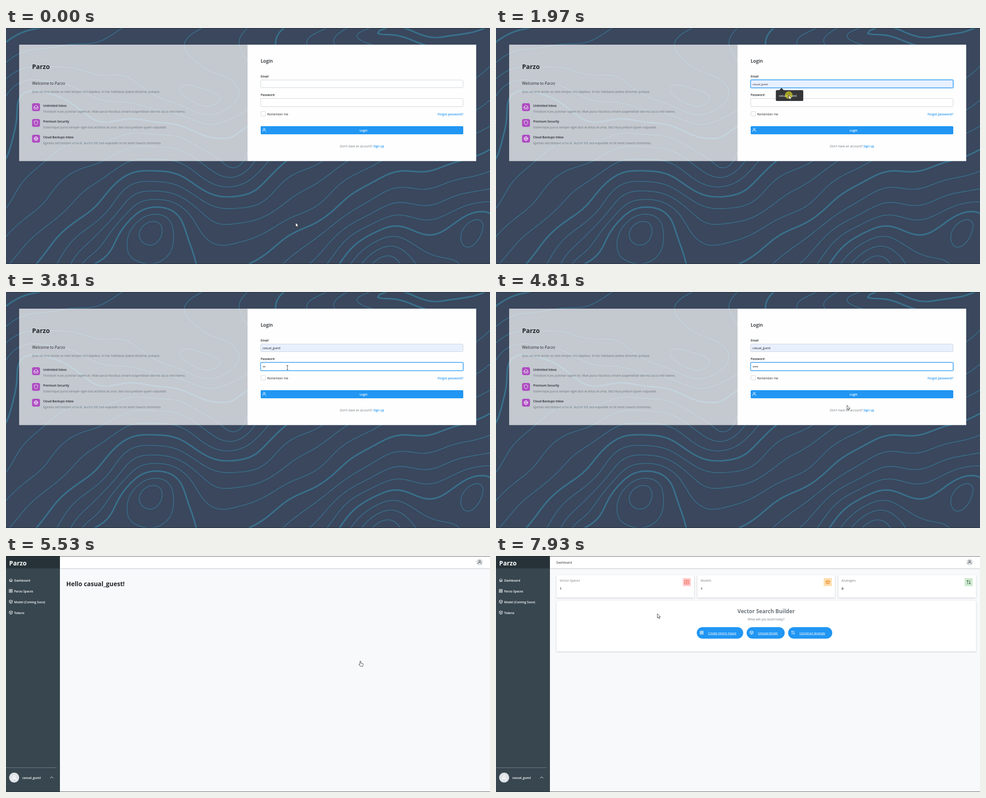
An HTML page that plays this animation: 1068x524 px, repeating every 8 s.

```html
<!DOCTYPE html>
<html lang="en">
<head>
<meta charset="utf-8">
<title>Login demo</title>
<style>
html, body { margin: 0; width: 100%; height: 100%; overflow: hidden; }
svg { display: block; width: 100%; height: 100%; }
text { font: 6.7px "Open Sans", "Noto Sans", sans-serif; fill: #212529; }
.semi { font-weight: 600; }
.bold { font-weight: 700; }
.mid { text-anchor: middle; }
.end { text-anchor: end; }
.grey { fill: #6c757d; }
.pale { fill: #9a9a9a; }
.white { fill: #fff; }
.blue { fill: #2196f3; }
.line { text-decoration: underline; }
.icon { fill: none; stroke: #fff; stroke-width: .9; stroke-linejoin: round; stroke-linecap: round; }
.field { fill: #fff; stroke: #ced4da; }
.card { fill: #fff; filter: drop-shadow(0 1px 1.5px #0003); }
#map { fill: none; stroke: #39708b; stroke-linecap: round; }
#cursor path { fill: #fff; stroke: #111; stroke-width: .75; stroke-linejoin: round; }
</style>
</head>
<body>
<svg viewBox="0 0 1068 524" preserveAspectRatio="none">
<defs>
  <g id="user"><circle cy="-1.7" r="2"/><path d="M-3.6 4V3Q-3.4 1.2-1.4 1.2H1.4Q3.4 1.2 3.6 3V4"/></g>
  <g id="home"><path d="M-3.6 0 0-3.3 3.6 0M-2.7-.7V3.2H2.7V-.7M-.9 3V.9H.9V3"/></g>
  <g id="grid"><path d="M-3.4-3.4h2.7v2.7h-2.7zM.7-3.4h2.7v2.7H.7zM-3.4.7h2.7v2.7h-2.7zM.7.7h2.7v2.7H.7z"/></g>
  <g id="box"><path d="M0-3.8 3.4-2V2L0 3.8-3.4 2V-2ZM-3.4-2 0-.2 3.4-2M0-.2V3.8"/></g>
  <g id="sort"><path d="M-2 3.6V-3.6M-3.6-2-2-3.6-.4-2M2-3.6V3.6M.4 2 2 3.6 3.6 2"/></g>
  <g id="table"><path d="M-4.2-3.6H4.2V3.6H-4.2ZM0-3.6V3.6M-4.2 0H4.2"/></g>
  <g id="inbox"><path d="M-4.2-.5-2.2-3.2Q0-5 2.2-3.2L4.2-.5V4H-4.2ZM-4.2 0H-2L-1 1.7H1L2 0H4.2"/></g>
  <g id="shield"><path d="M0-4.7 4-3.3Q4.5 2.3 0 4.7-4.5 2.3-4-3.3Z"/></g>
  <g id="globe"><circle r="4.3"/><ellipse rx="1.9" ry="4.3"/><path d="M-4.3 0H4.3"/></g>
</defs>

<g id="login">
  <rect width="1068" height="524" fill="#3a475d"/>
  <g id="map"></g>
  <rect x="29" y="37" width="504" height="258.5" fill="#fff" opacity=".7"/>
  <rect x="533" y="37" width="504.5" height="258.5" fill="#fefefe"/>
  <g id="form">
    <rect id="ring" fill="none" stroke="#a6d5fa" stroke-width="3" rx="2" x="562" width="447" height="18"/>
    <rect id="email" class="field" x="562" y="115.5" width="446.5" height="17" rx="2"/>
    <rect id="pass" class="field" x="562" y="156.5" width="446.5" height="18" rx="2"/>
    <rect class="field" x="562.5" y="185.5" width="10.5" height="10" rx="2"/>
    <rect id="button" x="562" y="218" width="447" height="18" rx="2"/>
    <text id="name" x="566" y="126.5">casual_guest</text>
    <g id="dots"></g>
    <path id="caret" d="M0 161.5V170.5" stroke="#212529" stroke-width=".6"/>
  </g>
  <g id="tip">
    <path d="M624 139 630 133 636 139Z" fill="#333"/>
    <rect x="617.5" y="138" width="60.5" height="24" rx="2" fill="#343537"/>
    <text class="white mid" x="644" y="153">casual_guest</text>
  </g>
</g>

<g id="app">
  <rect width="1068" height="524" fill="#f8f9fb"/>
  <rect class="card" x="119" width="949" height="27"/>
  <rect width="119" height="524" fill="#37464f"/>
  <rect width="119" height="27.5" fill="#263238"/>
  <rect id="hover" y="42" width="111.5" height="24" fill="#263238"/>
  <g id="side">
    <path d="M0 470H111.5" stroke="#7d878c"/>
    <path class="icon" d="M97.5 493.5 100.8 490 104.2 493.5"/>
    <circle cx="18" cy="492" r="11" fill="#dee2e6"/>
    <circle cx="1045" cy="13.7" r="7.3" fill="#dee2e6"/>
  </g>
  <g id="hello"></g>
  <g id="board">
    <rect class="card" x="133.5" y="99.5" width="925.5" height="112.5" rx="1"/>
  </g>
  <g id="status">
    <rect y="512" width="76.5" height="12" fill="#292a2d"/>
    <text class="end" x="73" y="520" style="fill:#bdc1c6">localhost:8080/dashboard</text>
  </g>
</g>

<path d="M0 .5H1068M0 523.5H1068" stroke="#20262d" opacity=".75"/>
<circle id="click" r="8.5" fill="#e8e020" opacity=".62"/>
<g id="cursor">
  <path id="arrow" d="M0 0V9.6L2.2 7.6 3.8 11 5.3 10.3 3.8 7.1H6.8Z"/>
  <path id="beam" d="M-2-4.5H2M0-4.5V4.5M-2 4.5H2"/>
  <path id="hand" d="M-1 .8Q0-.8 1 .8V4.8L5.3 5.8Q6.4 6.2 6.2 8L5.3 11.7H-.5L-3.3 8.2Q-3.5 6.8-2.4 6.9L-1 8Z"/>
</g>
</svg>

<script>
const $ = id => document.getElementById(id);
const add = (id, svg) => $(id).insertAdjacentHTML('beforeend', svg);
const text = (id, x, y, str, cls = '', size = 6.7) =>
  add(id, `<text x="${x}" y="${y}" class="${cls}" style="font-size:${size}px">${str}</text>`);
const icon = (id, name, x, y, color = '#fff', scale = 1) =>
  add(id, `<use href="#${name}" class="icon" style="stroke:${color}" transform="translate(${x} ${y}) scale(${scale})"/>`);
const box = (id, x, y, w, h, rx, attrs) =>
  add(id, `<rect x="${x}" y="${y}" width="${w}" height="${h}" rx="${rx}" ${attrs}/>`);

// Terrain: a tilted plane plus hills and hollows, slightly warped.
const hills = [
  { x: 318, y: 450, w: 100, h: 100, top: 8 },
  { x: 205, y: 530, w: 60, h: 50, top: 3 },
  { x: 835, y: 540, w: 130, h: 130, top: 8 },
  { x: 1030, y: 438, w: 45, h: 48, top: 3.5 },
  { x: 512, y: 300, w: 70, h: 90, top: -4 },
  { x: 430, y: 150, w: 160, h: 70, top: -5 },
  { x: 60, y: 170, w: 120, h: 80, top: 4 },
  { x: 845, y: 14, w: 120, h: 25, top: 3 }
];
function height(x, y) {
  const u = x + 8 * Math.sin(y / 37) + 3 * Math.sin(y / 17);
  const v = y + 8 * Math.sin(x / 41) + 3 * Math.sin(x / 19);
  return hills.reduce((sum, p) =>
    sum + p.top * Math.exp(-Math.hypot((u - p.x) / p.w, (v - p.y) / p.h, .2)), .008 * u + .014 * v);
}

// Marching squares: one path per whole level, every fourth one thick.
function drawMap(cell = 6) {
  const paths = {};
  for (let x = 0; x < 1068; x += cell) for (let y = 0; y < 524; y += cell) {
    const corners = [[x, y], [x + cell, y], [x + cell, y + cell], [x, y + cell]]
      .map(([a, b]) => [a, b, height(a, b)]);
    const z = corners.map(c => c[2]);
    for (let level = Math.ceil(Math.min(...z)); level < Math.max(...z); level++) {
      const cuts = [];
      corners.forEach((a, i) => {
        const b = corners[(i + 1) % 4];
        if (a[2] < level === b[2] < level) return;
        const k = (level - a[2]) / (b[2] - a[2]);
        cuts.push([0, 1].map(j => (a[j] + (b[j] - a[j]) * k).toFixed(1)).join(' '));
      });
      for (let i = 0; i < cuts.length; i += 2)
        paths[level] = (paths[level] || '') + `M${cuts[i]}L${cuts[i + 1]}`;
    }
  }
  for (const level in paths)
    add('map', `<path d="${paths[level]}" stroke-width="${level % 4 === 1 ? 3.4 : 1.6}"/>`);
}

function buildLogin() {
  text('login', 57.5, 91, 'Parzo', 'bold', 14);
  text('login', 57.5, 125.5, 'Welcome to Parzo', '', 8.7);
  text('login', 57.5, 143.5, 'Quis vel eros donec ac odio tempor orci dapibus. In hac habitasse platea dictumst quisque.', 'grey');
  [
    ['inbox', 'Unlimited Inbox', 'Tincidunt nunc pulvinar sapien et. Vitae purus faucibus ornare suspendisse sed nisi lacus sed viverra.'],
    ['shield', 'Premium Security', 'Scelerisque purus semper eget duis at tellus at urna. Sed risus pretium quam vulputate.'],
    ['globe', 'Cloud Backups Inbox', 'Egestas sed tempus urna et. Auctor elit sed vulputate mi sit amet mauris commodo.']
  ].forEach(([name, title, note], i) => {
    const y = 175 + 35 * i;
    box('login', 57.5, y - 8, 17.5, 17.5, 4, 'fill="#ad4cc1"');
    icon('login', name, 66.2, y + .7);
    text('login', 82, y, title, 'semi');
    text('login', 82, y + 13.3, note, 'grey');
  });
  text('form', 562, 77, 'Login', 'semi', 10.2);
  text('form', 562, 109.5, 'Email', 'semi', 6.6);
  text('form', 562, 151.3, 'Password', 'semi', 6.6);
  text('form', 576.5, 193.5, 'Remember me');
  text('form', 1009, 193.5, 'Forgot password?', 'blue end semi');
  icon('form', 'user', 569.7, 226);
  text('form', 789, 229.5, 'Login', 'white mid semi');
  text('form', 785.5, 265, 'Don\'t have an account? <tspan class="blue semi">Sign up</tspan>', 'grey mid');
  for (let i = 0; i < 4; i++) add('dots', `<circle cx="${567.8 + 3.1 * i}" cy="166" r=".95"/>`);
  $('login').append($('tip'));
}

function buildApp() {
  text('side', 7, 20.5, 'Parzo', 'bold white', 13.8);
  [['home', 'Dashboard'], ['grid', 'Parzo Spaces'], ['box', 'Model (Coming Soon)'], ['box', 'Tokens']]
    .forEach(([name, label], i) => {
      icon('side', name, 10.7, 53.5 + 24 * i);
      text('side', 18, 56.7 + 24 * i, label, 'white semi');
    });
  text('side', 36, 495, 'casual_guest', 'white semi');
  icon('side', 'user', 18, 492.5, '#fff', 1.35);
  icon('side', 'user', 1045, 13.2, '#444');
  text('hello', 133, 67, 'Hello casual_guest!', 'bold', 13.6);

  text('board', 133, 16.5, 'Dashboard');
  [
    ['table', 'Vector Spaces', 1, '#ffcdd2', '#f0664a'],
    ['box', 'Models', 1, '#ffe0b2', '#e8841d'],
    ['sort', 'Analogies', 0, '#d0ebd2', '#4d6651']
  ].forEach(([name, label, count, tint, color], i) => {
    const x = 133.5 + 311 * i;
    box('board', x, 42.5, 303.5, 50, 1, 'class="card"');
    text('board', x + 7, 56.5, label, 'pale semi');
    text('board', x + 7, 75, count, 'semi', 7.5);
    box('board', x + 278.5, 49, 18, 18, 0, `fill="${tint}"`);
    icon('board', name, x + 287.5, 58, color, 1.15);
  });
  text('board', 596, 127, 'Vector Search Builder', 'bold mid grey', 11.8);
  text('board', 596, 142.5, 'What will you build today?', 'mid grey');
  let x = 443;
  [['grid', 'Create Vector Space', 102.5], ['box', 'Upload Model', 84], ['sort', 'Construct Analogy', 97.5]]
    .forEach(([name, label, w]) => {
      box('board', x, 158, w, 25.5, 12.7, 'class="blue"');
      icon('board', name, x + 11, 170.2);
      text('board', x + w / 2 + 4.8, 173.5, label, 'white mid line');
      x += w + 7.5;
    });
}

// Pointer legs; the pointer is redrawn every TICK ms.
const TICK = 75;
const legs = [
  { from: 440, to: 1200, x: 630, y: 124 },
  { from: 1500, to: 1800, x: 646, y: 149 },
  { from: 2210, to: 2550, x: 621, y: 168 },
  { from: 4410, to: 4760, x: 772, y: 258 },
  { from: 4785, to: 4910, x: 782, y: 233 },
  { from: 5990, to: 6540, x: 22, y: 57 },
  { from: 7860, to: 7930, x: 356, y: 128 }
];
function pointer(t) {
  let x = 639, y = 432;
  for (const leg of legs) {
    if (t < leg.from) break;
    const n = Math.round((leg.to - leg.from) / TICK) + 1;
    const done = (t - leg.from) / (leg.to - leg.from) * (n - 1);
    const s = Math.min(n, Math.floor(done + 1e-6) + 1) / n;
    const ease = s * s * (3 - 2 * s);
    x += (leg.x - x) * ease;
    y += (leg.y - y) * ease;
  }
  return [x, y];
}

const clicks = [1350, 1895, 2550, 5130, 6780];
const keys = [3080, 3810, 4110, 4260];
const show = (id, on) => $(id).style.display = on ? '' : 'none';

function render(t) {
  const within = (a, b) => t >= a && t < b;
  const [x, y] = pointer(t);
  const over = (top, bottom) => x > 562 && x < 1009 && y > top && y < bottom;
  const overEmail = over(115, 133), overPass = over(156, 175), overButton = over(217, 237);
  const inApp = t >= 5530, loaded = t >= 6930;

  show('login', !inApp);
  show('app', inApp);

  const emailFocus = within(1350, 2550), passFocus = within(2550, 5055);
  show('ring', t >= 1350);
  $('ring').setAttribute('y', emailFocus ? 115 : passFocus ? 156.5 : 218);
  $('email').style.stroke = emailFocus || overEmail ? '#2196f3' : '';
  $('pass').style.stroke = passFocus || overPass ? '#2196f3' : '';
  $('email').style.fill = t >= 1800 ? '#e8f0fe' : '';
  show('name', t >= 1800);
  $('name').style.fontSize = t < 2045 ? '5.8px' : '';
  show('tip', within(1425, 2045));
  $('button').setAttribute('fill', overButton ? '#0d89ec' : '#2196f3');

  const typed = keys.filter(k => t >= k).length;
  [...$('dots').children].forEach((dot, i) => dot.style.display = i < typed ? '' : 'none');
  show('caret', within(2550, 3230));
  $('caret').setAttribute('transform', `translate(${566.5 + 3.1 * typed})`);

  show('hello', !loaded);
  show('board', loaded);
  show('hover', within(6390, 6930));
  show('status', within(6465, 7390));
  $('status').style.opacity = t < 7240 ? 1 : .5;

  show('click', clicks.some(c => within(c, c + 2 * TICK)));
  const onHand = inApp ? t < 5990 || within(6390, 7860) : overButton;
  const kind = onHand ? 'hand' : !inApp && (overEmail || overPass) ? 'beam' : 'arrow';
  for (const id of ['arrow', 'beam', 'hand']) show(id, id === kind);
  for (const id of ['click', 'cursor']) $(id).setAttribute('transform', `translate(${x} ${y})`);
}

function tick() {
  render(performance.now() % 8000);
  requestAnimationFrame(tick);
}

drawMap();
buildLogin();
buildApp();
tick();
</script>
</body>
</html>
```
